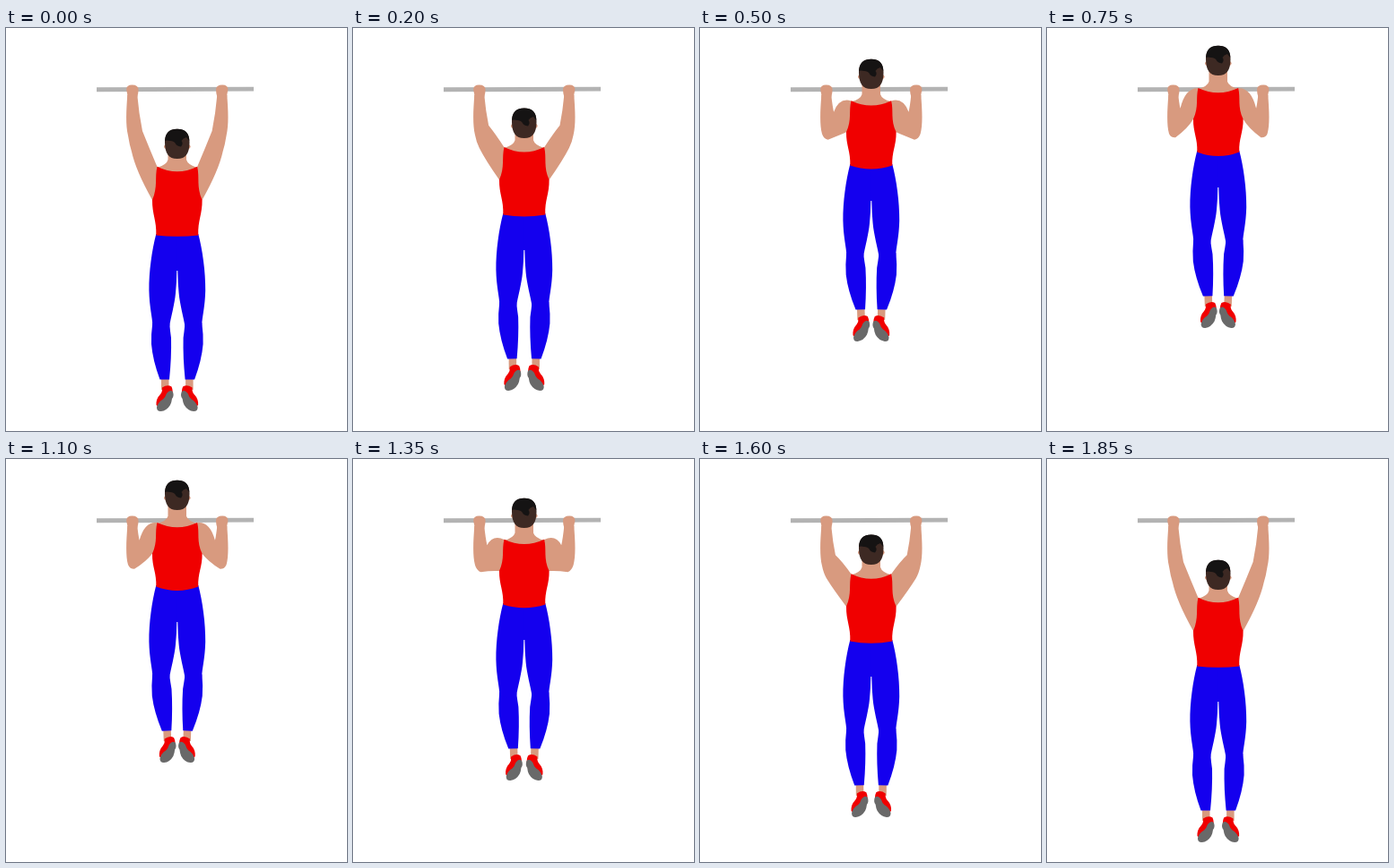
These frames come from a looping animation (380 px wide and 450 px high, 1.9 s). An HTML page:

```html
<!DOCTYPE html>
<html lang="en">
<head>
<meta charset="utf-8">
<title>Pull-ups</title>
<style>
  html, body { margin: 0; width: 100%; height: 100%; overflow: hidden; background: #fff; }
  svg { display: block; width: 380px; height: 450px; }
  .skin { fill: #d89a7f; }
  .red { fill: #f00000; }
  .blue { fill: #1400ee; }
  .mirror { transform: matrix(-1, 0, 0, 1, 381.6, 0); }
</style>
</head>
<body>
<svg viewBox="0 0 380 450">
  <path fill="#b3b3b3" d="M101 66.3L276 65.7V70.6L101 71.3Z"/>

  <g id="arm" class="skin">
    <path id="limb"/>
    <path d="M134.2 69Q134 63.5 140.5 63.5Q147.6 63.5 147.6 69Q147.6 73 146 78H135.5Q135.5 74 134.2 69Z"/>
  </g>
  <use href="#arm" class="mirror"/>

  <g id="body">
    <g id="leg">
      <g id="shin">
        <path class="skin" d="M173 388H181.5V404H173Z"/>
        <path class="red" d="M174 401.5Q180 397.5 184.5 400.5Q187 406 184.5 413L172 425L167.5 421Q167 414 172 409Q174.5 406 174 401.5Z"/>
        <path fill="#696969" d="M179 408Q183 403 186 406.5Q187.5 411 185 414Q184.5 418 183 421Q179 427.5 172.5 428Q167.5 428 168 423Q170 417 175 414.5Q177.5 412.5 179 408Z"/>
        <path class="blue" d="M163.3 329Q161.6 342 162 353Q163.5 371 171.5 392.5H182Q184.5 368 184 346Q183 339 182.2 330Q174 322 163.3 329Z"/>
      </g>
      <path class="blue" d="M167.3 230C162.6 248 159.2 272 159.4 293C159.8 312 163 322 163.5 333Q174 338 182.2 333C183.5 324 188 308 189 296Q190.2 284 190.3 271H191V230Z"/>
    </g>
    <use href="#leg" class="mirror"/>

    <g id="torso">
      <path class="skin" d="M180.5 130V147Q179 153 168 156V176H213.6V156Q202.6 153 201 147V130Z"/>
      <path id="shirt" class="red"/>
    </g>

    <g id="head">
      <ellipse class="skin" cx="190.8" cy="132.5" rx="14.8" ry="5"/>
      <path fill="#3d2923" d="M177 128C176.5 118 182 112.7 190.8 112.7S205 118 204.5 128C204.3 140 200.5 146 190.8 146S177.3 140 177 128Z"/>
      <path fill="#151313" d="M177.3 126C177.3 117 182 112.7 190.8 112.7S204.3 117 204.2 126L201 122Q197 123 195.5 126Q198 129 195 132.5Q190 132 188.5 128.5Q187 126 183 126Q179 125 177.3 126Z"/>
    </g>
  </g>
</svg>
<script>
const LOOP = 1900, STEP = 50;
const PEAK = 710, HANG = 1850, HEIGHT = 93;
const WAIST = 231;
const $ = id => document.getElementById(id);

// Sine ease from 0 to 1, skewed early (power < 1) or late (power > 1)
const ease = (u, power) => Math.sin(Math.PI / 2 * Math.min(1, u) ** power) ** 2;

// Quick pull, then a slow release back to the hang
const liftAt = t => HEIGHT * (t < PEAK
  ? ease(t / PEAK, 0.87)
  : 1 - ease((t - PEAK) / (HANG - PEAK), 1.87));

// The forearm stays put; the upper arm swings from the elbow to the moving shoulder
function armPath(lift, k, squash) {
  const between = (x0, y0, x1, y1) => `${x0 + (x1 - x0) * k} ${y0 + (y1 - y0) * k}`;
  const onTorso = y => WAIST - (WAIST - y) * squash - lift;
  const pit = onTorso(192), shoulder = onTorso(155);
  return `M135.3 75C134 92 133.2 108 ${between(136, 120, 136, 118)}`
    + `Q${between(137.5, 130, 138, 123)} ${between(140, 138, 143, 123)}`
    + `Q${between(144.5, 159, 156, 115)} 163 ${pit}`
    + `H173V${shoulder + 2}L168.5 ${shoulder}`
    + `Q${between(160, 135, 154.7, 70)} ${between(152, 115, 148.7, 91)}`
    + `Q${between(148, 95, 147.5, 86)} 146.3 75Z`;
}

const shirtPath = k => 'M168.5 154.7Q190.8 166 213.1 154.7C216 167 212 177 218.6 192'
  + `C218.9 208 213.6 215 214.3 231.5Q190.8 ${234 + 7 * k} 167.3 231.5`
  + 'C168 215 162.7 208 163 192C169.5 177 165.5 167 168.5 154.7Z';

function draw(t) {
  const lift = liftAt(t), k = lift / 88;
  const squash = 1 - 0.066 * k;
  $('limb').setAttribute('d', armPath(lift, k, squash));
  $('shirt').setAttribute('d', shirtPath(k));
  $('body').setAttribute('transform', `translate(0 ${-lift})`);
  $('shin').setAttribute('transform', `rotate(${-2.2 * k} 174 333)`);
  $('torso').setAttribute('transform', `matrix(1 0 0 ${squash} 0 ${WAIST * (1 - squash)})`);
}

const start = performance.now();
function tick() {
  const t = (performance.now() - start) % LOOP;
  draw(Math.floor(t / STEP) * STEP);
  requestAnimationFrame(tick);
}
tick();
</script>
</body>
</html>
```
